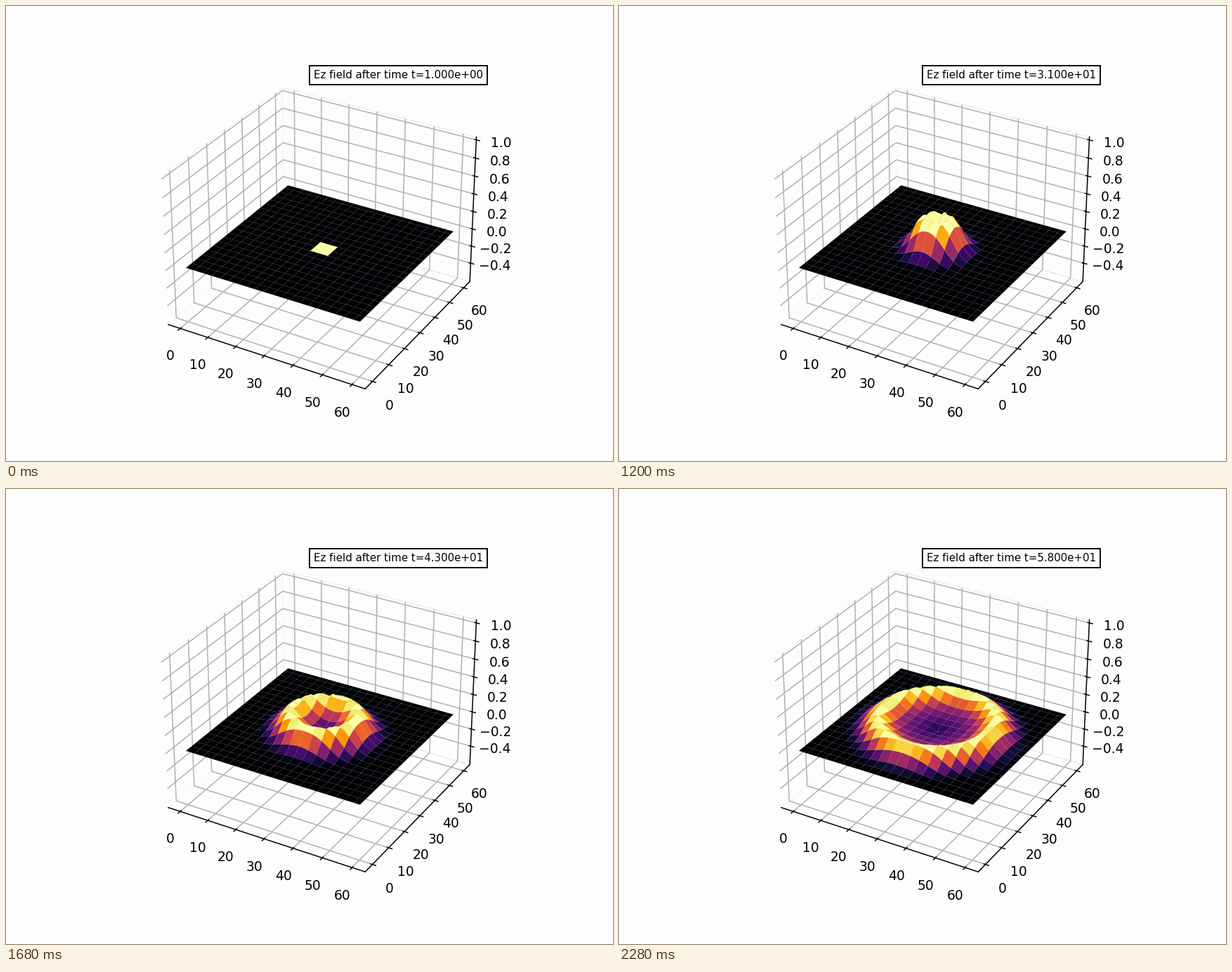
Write a matplotlib script that moves like this. It is 864 px wide and 648 px high and loops after 2320 ms.

```python
import numpy as np
import matplotlib.pyplot as plt
from matplotlib.animation import FuncAnimation
from matplotlib.offsetbox import AnchoredText

SIZE = 60
STEPS = 58
INTERVAL = 40
PULSE_DELAY, PULSE_SPREAD = 20, 6
PAPER = "#fdfdfd"


def simulate(steps):
    """2D FDTD (TM mode) with a Gaussian pulse forced at the grid centre."""
    ez, hx, hy = np.zeros((3, SIZE, SIZE))
    mid = SIZE // 2
    fields = []
    for t in range(1, steps + 1):
        ez[1:, 1:] += 0.5 * (hy[1:, 1:] - hy[:-1, 1:] - hx[1:, 1:] + hx[1:, :-1])
        ez[mid, mid] = np.exp(-0.5 * ((PULSE_DELAY - t) / PULSE_SPREAD) ** 2)
        hx[:-1, :-1] += 0.5 * (ez[:-1, :-1] - ez[:-1, 1:])
        hy[:-1, :-1] += 0.5 * (ez[1:, :-1] - ez[:-1, :-1])
        fields.append(ez.copy())
    return fields


def padded(low, high):
    """Widen a range by the small gap between data limits and box edges."""
    gap = (high - low) / 48
    return low - gap, high + gap


fields = simulate(STEPS)
coords = np.linspace(0, SIZE, SIZE)
X, Y = np.meshgrid(coords, coords)

fig = plt.figure(figsize=(6.4, 4.8), dpi=135, facecolor=PAPER)
ax = fig.add_subplot(projection="3d", facecolor=PAPER)
ax.set_autoscale_on(False)
for axis in (ax.xaxis, ax.yaxis, ax.zaxis):
    axis.pane.fill = False

caption = AnchoredText("", loc="upper right", prop=dict(size=8))
caption.patch.set_facecolor(PAPER)
ax.add_artist(caption)
surface = None


def draw(frame):
    global surface
    if surface is not None:
        surface.remove()
    surface = ax.plot_surface(X, Y, fields[frame], rstride=3, cstride=3,
                              cmap="inferno")
    ax.set_xlim(*padded(-3, 63))
    ax.set_ylim(*padded(-3, 63))
    ax.set_zlim(*padded(-0.585, 1.0))
    ax.set_xticks(range(0, 61, 10))
    ax.set_yticks(range(0, 61, 10))
    ax.set_zticks(np.arange(-2, 6) / 5)
    caption.txt.set_text(f"Ez field after time t={frame + 1:.3e}")
    return surface, caption


animation = FuncAnimation(fig, draw, frames=STEPS, interval=INTERVAL,
                          repeat=True, repeat_delay=0)
plt.show()
```
